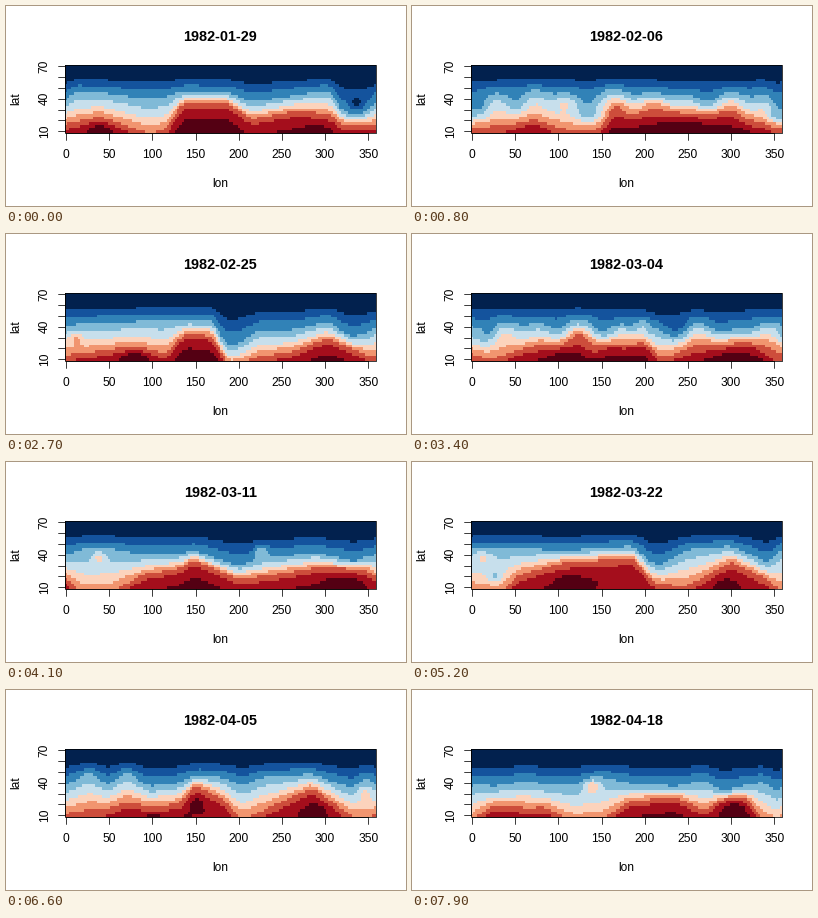
Recreate the animation shown at these times as a matplotlib script. Size 400 by 200 pixels, loop 8000 ms.

```python
import numpy as np
import matplotlib.pyplot as plt
from matplotlib.animation import FuncAnimation
from matplotlib.colors import ListedColormap, to_rgb

plt.rcParams["font.family"] = "Liberation Sans"

DAYS, STEP = 80, 100
START = np.datetime64("1982-01-29")
PX = 0.72                                   # points per pixel at 100 dpi
L, R, T, B = 59.04, 369.76, 59.04, 126.56   # plot region in pixels
LON = np.arange(0, 360, 2.5)
LAT = np.arange(10, 71, 2.5)
DRIFT = 4                                   # degrees east per day

RDBU = ("#053061 #2166AC #4393C3 #92C5DE #D1E5F0 "
        "#FDDBC7 #F4A582 #D6604D #B2182B #67001F").split()
CMAP = ListedColormap([np.array(to_rgb(c)) ** (2.2 / 1.8) for c in RDBU])


class State:
    """Height field in colour levels, 0 cold to 10 warm.

    front: lon, latitude of the cool edge, latitude of the warm edge
    cells: lon, lat, strength, width of closed highs and lows
    """

    def __init__(self, day, front, cells):
        self.day, self.cells = day, cells
        self.lon, self.cool, self.warm = np.array(front, float).T

    def edge(self, lon, lat):
        return np.mean([np.interp(lon + s, self.lon, lat, period=360)
                        for s in np.linspace(-5, 5, 5)], axis=0)

    def field(self, lon):
        cool, warm = self.edge(lon, self.cool), self.edge(lon, self.warm)
        navy = 56 + (cool - 42) / 2
        mid = warm + 0.45 * (cool - warm)
        cuts = np.array([warm - 18, warm - 6, warm, mid, cool, navy, navy + 10])
        z = np.array([np.interp(LAT, c, [9, 8, 7, 5, 3, 1, 0]) for c in cuts.T]).T
        for x, y, amp, w in self.cells:
            dx = (lon - x + 180) % 360 - 180
            z += amp * np.exp(-(dx / w) ** 2 - ((LAT[:, None] - y) / 6) ** 2)
        return z


STATES = [
    State(0, [(10, 47, 18), (40, 46, 23), (95, 40, 8), (115, 42, 11), (135, 47, 36),
              (188, 46, 36), (214, 37, 21), (270, 44, 29), (306, 48, 25), (320, 28, 16),
              (345, 27, 15)],
          [(39, 12, 1, 17), (292, 11, .8, 14), (336, 36, -1.4, 9)]),
    State(17, [(0, 40, 4), (43, 51, 5), (95, 47, 9), (142, 48, 4), (170, 47, 6),
               (197, 49, 16), (250, 42, 20), (290, 45, 31), (328, 43, 24), (350, 43, 15)],
          [(25, 23, -2.8, 13), (142, 36, 2.6, 11), (171, 24, -2, 15), (287, 13, 1.1, 22)]),
    State(27, [(0, 42, 13), (80, 45, 21), (115, 46, 14), (138, 46, 34), (170, 46, 31),
               (187, 22, 5), (203, 26, 6), (222, 37, 12), (260, 37, 16), (303, 45, 29),
               (330, 31, 20), (350, 35, 13)],
          [(80, 12, 1.2, 18), (11, 30, 1.4, 9)]),
    State(41, [(0, 40, 18), (22, 46, 2), (50, 46, 4), (90, 40, 22), (130, 41, 27),
               (148, 44, 35), (200, 30, 18), (226, 37, 20), (290, 42, 28), (335, 34, 27),
               (352, 40, 24)],
          [(38, 38, 1.5, 8), (226, 43, 1.6, 8), (321, 15, 1.1, 21)]),
    State(52, [(0, 46, 6), (30, 46, 5), (55, 46, 22), (105, 44, 33), (187, 48, 37),
               (207, 33, 17), (218, 31, 13), (250, 45, 12), (300, 48, 34), (343, 33, 17)],
          [(12, 38, 1.4, 12), (27, 20, -1.5, 10), (113, 16, 1, 17), (291, 12, 1, 10)]),
    State(66, [(0, 38, 12), (28, 50, 16), (47, 38, 16), (71, 50, 23), (95, 37, 18),
               (130, 40, 21), (150, 47, 38), (182, 45, 25), (203, 37, 7), (225, 45, 14),
               (285, 48, 36), (332, 35, 9), (346, 45, 8)],
          [(100, 9, .9, 25), (151, 22, 1, 8), (290, 15, 1, 14), (346, 31, 1, 8)]),
    State(79, [(0, 40, 5), (25, 37, 19), (65, 42, 16), (85, 38, 17), (118, 38, 3),
               (150, 45, 4), (180, 40, 22), (235, 37, 27), (268, 42, 14), (291, 33, 25),
               (316, 38, 27), (338, 41, 5), (355, 31, 0)],
          [(139, 37, 2.4, 9), (302, 16, 1.1, 14)]),
]


def weather(day):
    """Blend neighbouring states while both drift east."""
    i = max(k for k, s in enumerate(STATES[:-1]) if s.day <= day)
    a, b = STATES[i:i + 2]
    u = (day - a.day) / (b.day - a.day)
    mix = u * u * (3 - 2 * u)
    z = ((1 - mix) * a.field(LON - DRIFT * (day - a.day))
         + mix * b.field(LON + DRIFT * (b.day - day)))
    belt = np.exp(-((LAT[:, None] - 36) / 12) ** 2)
    waves = sum(np.sin(np.radians(n * (LON - v * day)) + n) for n, v in [(5, 7), (8, 9)])
    z = z + 0.5 * np.sin(np.pi * u) * belt * waves
    warm = 5 + (z - 5) * 4.95 / (z.max() - 5)
    return np.clip(np.where(z > 5, warm, z), 0, 10)


def px(lon):
    return L + (lon + 1.25) * (R - L) / 360


def py(lat):
    return B - (lat - 8.75) * (B - T) / 62.5


fig = plt.figure(figsize=(4, 2), dpi=100, facecolor="white")
ax = fig.add_axes([0, 0, 1, 1])
ax.axis("off")


def line(xs, ys):
    ax.plot(xs, ys, color="black", lw=0.75 * PX, solid_capstyle="round", zorder=3)


def label(x, y, s, size=12, **kw):
    return ax.text(x, y, s, size=size * PX, ha="center", va="baseline",
                   rotation_mode="anchor", **kw)


img = ax.imshow(weather(0), cmap=CMAP, vmin=0, vmax=10, origin="lower",
                extent=(L, R, B, T), interpolation="nearest", aspect="auto")
ax.set(xlim=(0, 400), ylim=(200, 0))

line([L, R, R, L, L], [T, T, B, B, T])
line([px(0), px(350)], [B, B])
line([L, L], [py(10), py(70)])
for lon in range(0, 351, 50):
    line([px(lon)] * 2, [B, B + 7.2])
    label(px(lon), 152.5, str(lon))
for lat in range(10, 71, 10):
    line([L - 7.2, L], [py(lat)] * 2)
    if lat % 30 == 10:
        label(41.8, py(lat), str(lat), rotation=90)
label((L + R) / 2, 181.3, "lon")
label(13, (T + B) / 2, "lat", rotation=90)
title = label((L + R) / 2, 34.8, str(START), 14.4, weight="bold")


def update(day):
    img.set_data(weather(day))
    title.set_text(str(START + day))
    return img, title


anim = FuncAnimation(fig, update, frames=DAYS, interval=STEP, repeat=True, repeat_delay=0)
plt.show()
```
